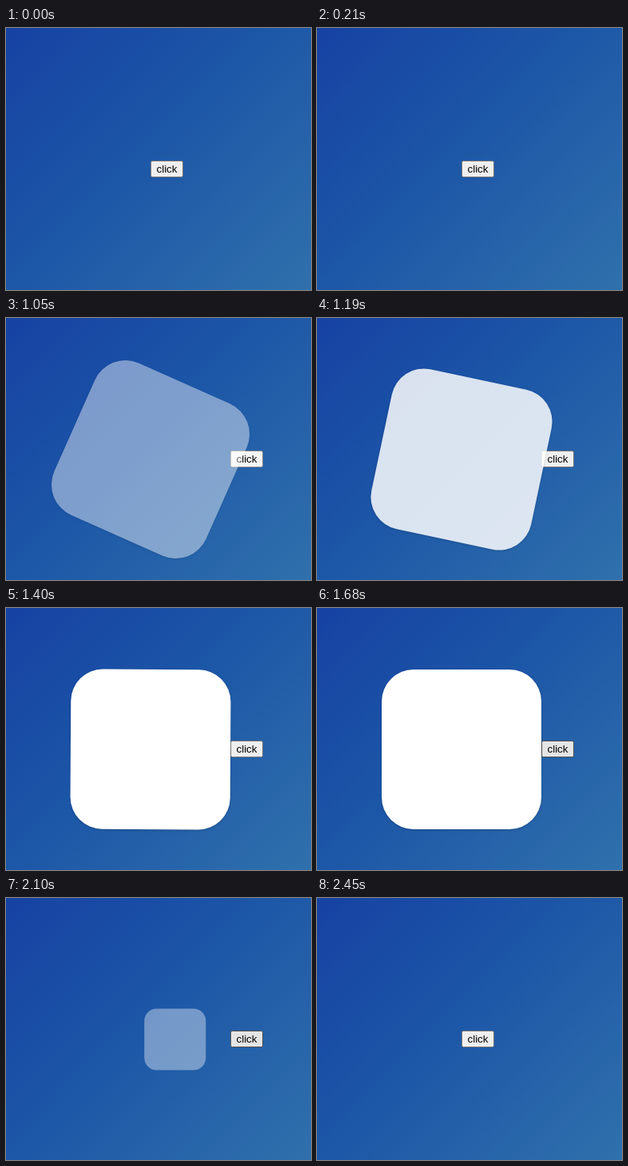
Write an HTML page that moves like this. It is 382 px wide and 328 px high and loops after 3010 ms.

```html
<!DOCTYPE html>
<html lang="en">
<head>
<meta charset="utf-8">
<title>Toggle box</title>
<style>
  html, body { margin: 0; width: 100%; height: 100%; overflow: hidden; }
  #stage {
    position: relative; width: 382px; height: 328px; overflow: hidden;
    background: linear-gradient(135deg, #1642a3, #1c56a7 45%, #3070ac);
  }
  #button {
    position: absolute; left: 181px; top: 166px; width: 41px; height: 21px;
    box-sizing: border-box; border: 1px solid; border-radius: 2.5px;
    font: 13.333px/19px Arial, "Liberation Sans", sans-serif;
    color: #000; text-align: center;
  }
  #box {
    position: absolute; left: 81px; top: 77px; width: 200px; height: 200px;
    border-radius: 40px; background: #fff;
    box-shadow: 0 1px 3px rgba(0, 0, 0, .2);
  }
</style>
</head>
<body>
<div id="stage">
  <div id="button">click</div>
  <div id="box"></div>
</div>
<script>
const LOOP = 3010, TICK = 70, FADE = 500;
const ENTER = 920, LEAVE = 1922;
const button = document.getElementById('button');
const box = document.getElementById('box');

// start time, x shift, fill, border
const states = [
  [0, 0, '#efefef', '#767676'],
  [910, 0, '#e6e6e6', '#8d8d8d'],
  [980, 100, '#f5f5f5', '#8d8d8d'],
  [1190, 100, '#efefef', '#767676'],
  [1680, 100, '#e5e5e5', '#4f4f4f'],
  [1890, 100, '#f5f5f5', '#8d8d8d'],
  [1960, 100, '#e5e5e5', '#4f4f4f'],
  [2450, 0, '#efefef', '#767676']
];

const clamp = v => Math.min(1, Math.max(0, v));
const curve = (a, b, s) => 3 * s * (1 - s) ** 2 * a + 3 * s * s * (1 - s) * b + s ** 3;

// CSS "ease": cubic-bezier(.25, .1, .25, 1)
function ease(x) {
  let lo = 0, hi = 1;
  for (let i = 0; i < 24; i++) {
    const mid = (lo + hi) / 2;
    if (curve(.25, .25, mid) < x) lo = mid; else hi = mid;
  }
  return curve(.1, 1, lo);
}

function draw(t) {
  const [, shift, fill, border] = states.filter(s => s[0] <= t).pop();
  button.style.transform = `translateX(${shift}px)`;
  button.style.background = fill;
  button.style.borderColor = border;

  const enter = clamp((t - ENTER) / FADE);
  const leave = ease(clamp((t - LEAVE) / FADE));
  const angle = 37.2 * (1 - enter) ** 1.46;
  const scale = (1 + .06 * (1 - enter) ** 1.3) * (1 - leave);
  box.style.opacity = t < ENTER ? 0 : ease(enter) * (1 - leave);
  box.style.transform = `translateX(${50 * leave}px) scale(${scale}) rotate(${angle}deg)`;
}

const start = performance.now();
function frame(now) {
  const t = Math.max(0, now - start) % LOOP;
  draw(Math.floor(t / TICK) * TICK);
  requestAnimationFrame(frame);
}
draw(0);
requestAnimationFrame(frame);
</script>
</body>
</html>
```
